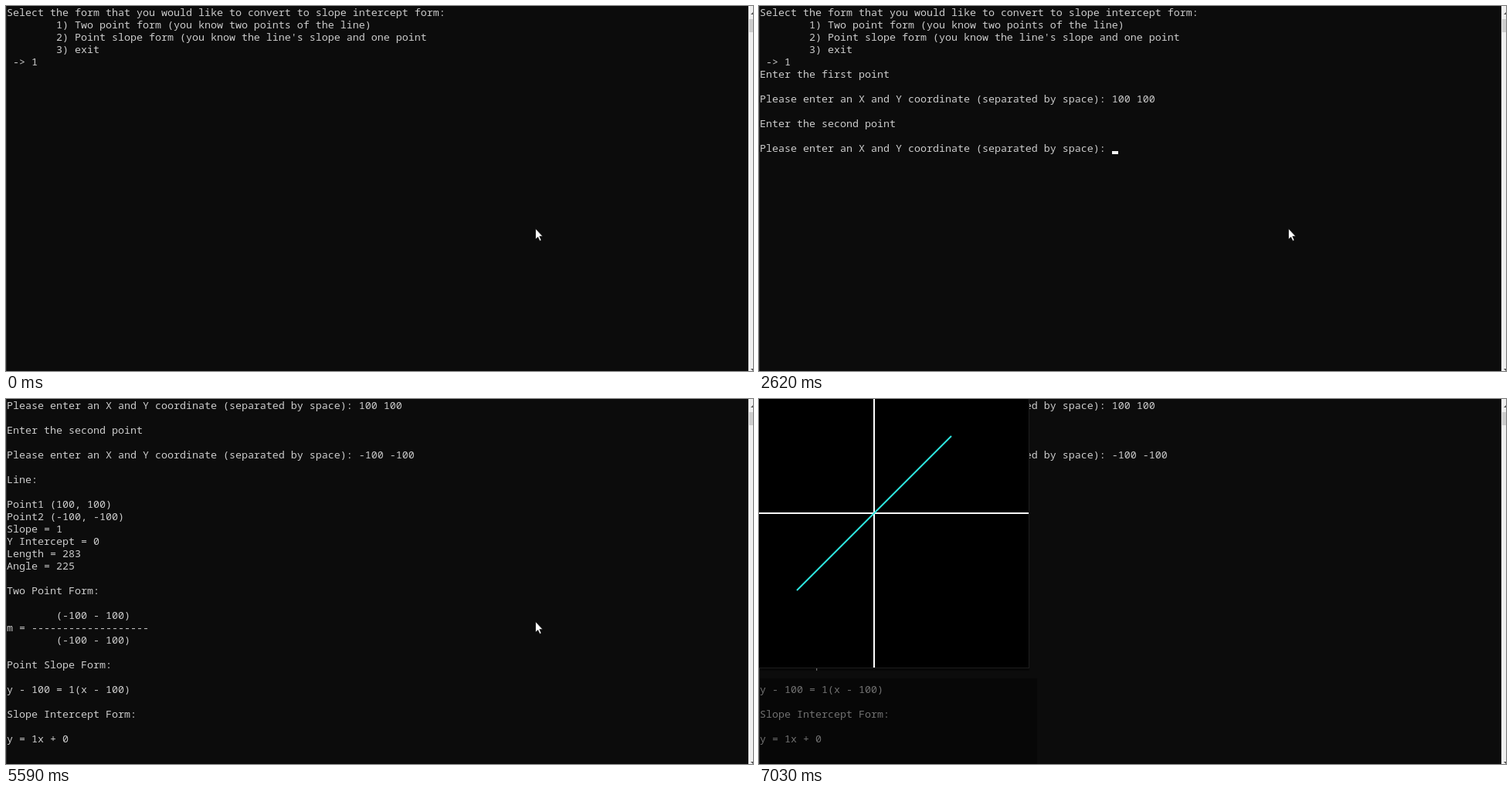
These frames come from a looping animation (967x473 px, 8000 ms). An HTML page:

```html
<!DOCTYPE html>
<html lang="en">
<head>
<meta charset="utf-8">
<style>
  html, body { margin: 0; width: 100%; height: 100%; overflow: hidden; background: #0c0c0c; }
  pre {
    position: absolute; left: 1px; top: 0; margin: 0; color: #ccc;
    font: 13.3333px/16px "Noto Sans Mono", monospace; font-variant-ligatures: none;
  }
  svg { position: absolute; left: 0; top: 0; }
</style>
</head>
<body>
<pre id="console"></pre>
<svg width="967" height="473">
  <path d="M.5 0V473" stroke="#2b2b2b"/>
  <rect x="961" width="6" height="473" fill="#f0f0f0"/>
  <rect x="962" y="17" width="5" height="17" fill="#cdcdcd"/>
  <path d="M964 11l3-3v3zM964 470h3v3z" fill="#505050"/>
  <rect id="caret" width="8" height="4" fill="#f2f2f2"/>
  <g id="plot">
    <path d="M1 349h349v3H1zM1 362h359v111H1z" opacity=".45"/>
    <rect width="350" height="349" fill="#1d1d1d"/>
    <rect width="349" height="348"/>
    <path d="M149 0V348M0 148H349" stroke="#fff" stroke-width="2"/>
    <path d="M49 248L249 48" stroke="#2ee6e0" stroke-width="2"/>
  </g>
  <path id="pointer" d="M.5.5V14.3L3.6 11.4L6 16.4L8 15.5L5.7 10.6H9.8Z" fill="#fff" stroke="#000" stroke-width=".6"/>
</svg>
<script>
const LOOP = 8000;
const ask = "Please enter an X and Y coordinate (separated by space): ";
const menu = `Select the form that you would like to convert to slope intercept form:
        1) Two point form (you know two points of the line)
        2) Point slope form (you know the line's slope and one point
        3) exit
 -> 1
`;
const first = menu + "Enter the first point\n\n" + ask;
const tail = "100 100\n\nEnter the second point\n\n" + ask;
const second = first + tail;
const report = ask + tail + `-100 -100

Line:

Point1 (100, 100)
Point2 (-100, -100)
Slope = 1
Y Intercept = 0
Length = 283
Angle = 225

Two Point Form:

        (-100 - 100)
m = -------------------
        (-100 - 100)

Point Slope Form:

y - 100 = 1(x - 100)

Slope Intercept Form:

y = 1x + 0`;

// [start, text, caret visible]
const screens = [
  [0, menu, 0],
  [390, first, 1], [1260, first + "1", 1], [1410, first + "10", 1], [1530, first + "100", 1],
  [1680, first + "100 ", 1], [1820, first + "100 1", 1], [1950, first + "100 1", 0],
  [2070, first + "100 10", 1], [2220, first + "100 100", 1], [2470, first + "100 100", 0],
  [2620, second, 1], [3330, second + "-", 1], [3480, second + "-", 0], [3730, second + "-1", 1],
  [4020, second + "-10", 0], [4170, second + "-100", 1], [4320, second + "-100 ", 1],
  [4470, second + "-100 -", 1], [4590, second + "-100 -", 0], [4890, second + "-100 -1", 1],
  [5010, second + "-100 -10", 1], [5160, second + "-100 -100", 1],
  [5470, report, 0]
];
// [start, opacity, scale]
const plotSteps = [[0, 0, 1], [6050, .45, .95], [6180, .93, .997], [6330, 1, 1]];
// [start, x, y, opacity]
const pointerSteps = [[0, 685, 288, 1], [6760, 486, 192, 1], [6880, 288, 97, 1], [7030, 288, 97, 0]];

const at = (steps, t) => steps.findLast(step => step[0] <= t);
const el = id => document.getElementById(id);
const set = (id, attrs) => {
  for (const name in attrs) el(id).setAttribute(name, attrs[name]);
};

function draw(now) {
  const t = now % LOOP;
  const [, text, caretOn] = at(screens, t);
  if (el("console").textContent !== text) el("console").textContent = text;

  const lines = text.split("\n");
  set("caret", { x: 1 + 8 * lines.at(-1).length, y: 16 * lines.length - 4, opacity: caretOn });

  const [, opacity, scale] = at(plotSteps, t);
  set("plot", { opacity, transform: `translate(149 148) scale(${scale}) translate(-149 -148)` });

  const [, x, y, shown] = at(pointerSteps, t);
  set("pointer", { transform: `translate(${x} ${y})`, opacity: shown });
  requestAnimationFrame(draw);
}
requestAnimationFrame(draw);
</script>
</body>
</html>
```
